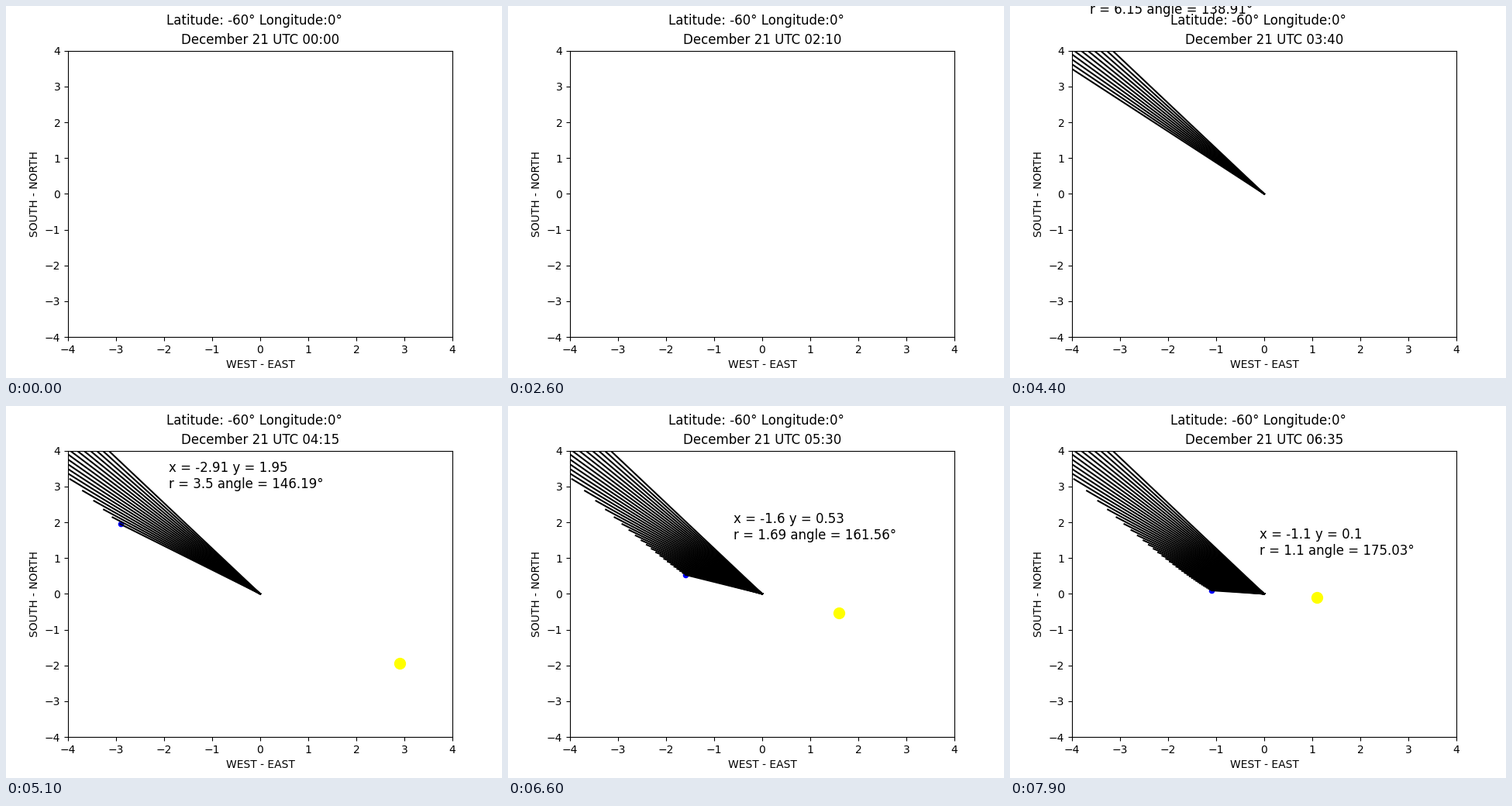
Animation of 640x480 px, one loop 8 s. Source, as a matplotlib script:

```python
import math

import matplotlib.pyplot as plt
from matplotlib.animation import FuncAnimation

FRAMES, INTERVAL = 80, 100
STEP_MIN = 5
LAT = math.radians(-60)
DEC = math.radians(-23.44)
STICK = 0.5


def shadow(minute):
    """Tip of the stick's shadow, or None while the sun is down."""
    t = minute / 60
    # Hour angle with a small equation-of-time drift
    h = math.radians(15 * (t - 12) - 0.0229 - 0.0052 * t)
    up = math.sin(LAT) * math.sin(DEC) + math.cos(LAT) * math.cos(DEC) * math.cos(h)
    if up <= 0:
        return None
    east = -math.cos(DEC) * math.sin(h)
    north = math.cos(LAT) * math.sin(DEC) - math.sin(LAT) * math.cos(DEC) * math.cos(h)
    return -STICK * east / up, -STICK * north / up


def describe(x, y):
    r = math.hypot(x, y)
    angle = math.degrees(math.atan2(y, x))
    return (f"x = {round(x, 2)} y = {round(y, 2)}\n"
            f"r = {round(r, 2)} angle = {round(angle, 2)}°")


fig, ax = plt.subplots(figsize=(6.4, 4.8), dpi=100)
fig.suptitle("Latitude: -60° Longitude:0°")
ax.set(xlim=(-4, 4), ylim=(-4, 4), xlabel="WEST - EAST", ylabel="SOUTH - NORTH")
title = ax.set_title("December 21 UTC 00:00")

tips = [shadow(i * STEP_MIN) for i in range(FRAMES)]
rays = [(i, ax.plot([0, tip[0]], [0, tip[1]], color="black", lw=1.5)[0])
        for i, tip in enumerate(tips) if tip]
sun = ax.scatter([0], [0], s=100, color="yellow")
dot = ax.scatter([0], [0], s=20, color="blue")
label = ax.text(0, 0, "", fontsize=12)


def update(i):
    hour, minute = divmod(i * STEP_MIN, 60)
    title.set_text(f"December 21 UTC {hour:02d}:{minute:02d}")
    for first, ray in rays:
        ray.set_visible(first <= i)
    tip = tips[i]
    for artist in (sun, dot, label):
        artist.set_visible(tip is not None)
    if tip:
        x, y = tip
        dot.set_offsets([(x, y)])
        sun.set_offsets([(-x, -y)])
        label.set_position((x + 1, y + 1))
        label.set_text(describe(x, y))
    return []


anim = FuncAnimation(fig, update, frames=FRAMES, interval=INTERVAL,
                     repeat=True, repeat_delay=0, blit=False)
plt.show()
```
